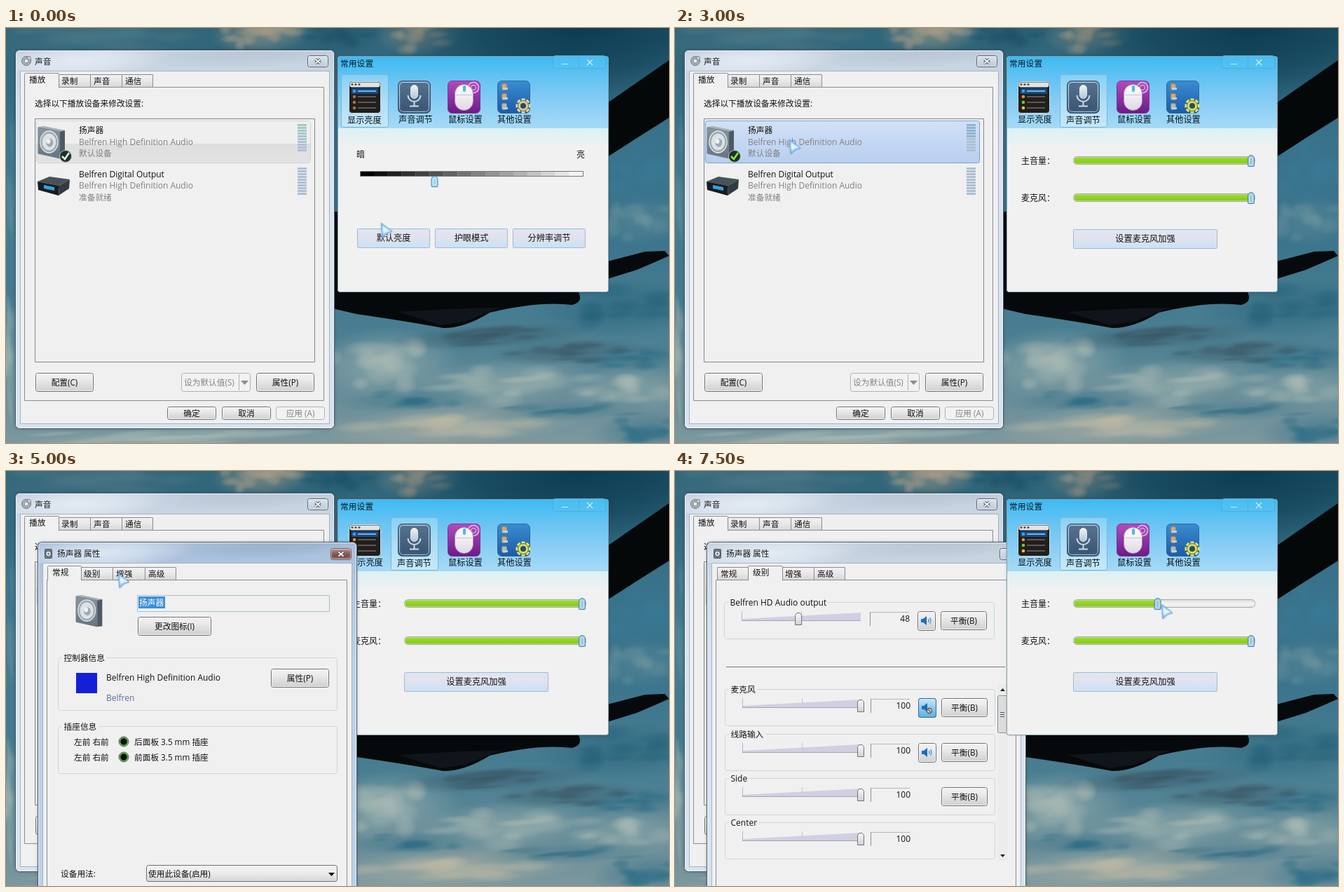
These frames come from a looping animation (946x592 px, 8 s). An HTML page with a canvas:

```html
<!DOCTYPE html>
<html lang="zh-CN">
<head>
<meta charset="utf-8">
<title>声音设置</title>
<style>
html, body { margin: 0; width: 946px; height: 592px; overflow: hidden; background: #3f6f80; }
canvas { display: block; }
</style>
</head>
<body>
<canvas id="stage" width="946" height="592"></canvas>
<script>
const c = document.getElementById('stage').getContext('2d');
const FONT = '"Open Sans","Noto Sans CJK SC","Noto Sans CJK",sans-serif';
const LOOP = 8000, STEP = 500;
const AUDIO = 'Belfren High Definition Audio';

// pointer position for each half second
const POINTER = [
  [535, 278], [513, 98], [89, 487], [587, 95], [587, 95], [588, 97], [163, 159], [182, 171],
  [389, 422], [399, 496], [160, 146], [144, 149], [627, 153], [855, 187], [822, 188], [694, 190]
];

function grad(y0, y1, ...cols) {
  const g = c.createLinearGradient(0, y0, 0, y1);
  cols.forEach((col, i) => g.addColorStop(i / (cols.length - 1), col));
  return g;
}

function box(x, y, w, h, fill, line, r = 0) {
  c.beginPath();
  c.roundRect(x + .5, y + .5, w - 1, h - 1, r);
  if (fill) { c.fillStyle = fill; c.fill(); }
  if (line) { c.strokeStyle = line; c.lineWidth = 1; c.stroke(); }
}

function rect(x, y, w, h, fill) {
  c.fillStyle = fill;
  c.fillRect(x, y, w, h);
}

function poly(pts, fill, line) {
  c.beginPath();
  pts.forEach(p => c.lineTo(p[0], p[1]));
  c.closePath();
  if (fill) { c.fillStyle = fill; c.fill(); }
  if (line) { c.strokeStyle = line; c.lineWidth = 1; c.stroke(); }
}

function disc(x, y, r, fill, line, lw = 1) {
  c.beginPath();
  c.arc(x, y, r, 0, 7);
  if (fill) { c.fillStyle = fill; c.fill(); }
  if (line) { c.strokeStyle = line; c.lineWidth = lw; c.stroke(); }
}

function text(s, x, y, col = '#111', size = 11.7, align = 'left') {
  c.font = size + 'px ' + FONT;
  c.textAlign = align;
  c.fillStyle = col;
  c.fillText(s, x, y);
}

function button(x, y, w, h, label, off) {
  box(x, y, w, h, off ? '#f2f2f2' : grad(y, y + h, '#f3f3f3', '#ebebeb', '#dcdcdc', '#cfcfcf'), off ? '#adb2b5' : '#707070', 3);
  if (!off) box(x + 1, y + 1, w - 2, h - 2, null, 'rgba(255,255,255,.7)', 2);
  if (label) text(label, x + w / 2, y + h / 2 + 4.5, off ? '#838383' : '#111', 11.7, 'center');
}

function blob(x, y, rx, ry, rgb, a) {
  c.save();
  c.translate(x, y);
  c.rotate(-.06);
  c.scale(rx, ry);
  const g = c.createRadialGradient(0, 0, 0, 0, 0, 1);
  g.addColorStop(0, `rgba(${rgb},${a})`);
  g.addColorStop(.5, `rgba(${rgb},${a * .65})`);
  g.addColorStop(1, `rgba(${rgb},0)`);
  c.fillStyle = g;
  c.fillRect(-1, -1, 2, 2);
  c.restore();
}

function sky() {
  let seed = 11;
  const rnd = () => (seed = seed * 16807 % 2147483647) / 2147483647;
  // a lumpy cloud: one soft body with small puffs around it
  const cloud = (x, y, w, h, rgb, a) => {
    blob(x, y, w, h, rgb, a * .6);
    for (let i = 0; i < 14; i++) {
      const t = rnd() * 6.3, d = rnd();
      blob(x + Math.cos(t) * d * w * .8, y + Math.sin(t) * d * h * .8, w * (.12 + rnd() * .2), h * (.15 + rnd() * .3), rgb, a * .6);
    }
  };
  const pale = '172,187,180', warm = '188,184,164', beige = '172,158,136';
  const blue = '46,108,132', deep = '12,60,82', dark = '58,88,102';

  rect(0, 0, 946, 592, grad(0, 592, '#2f6478', '#38718a', '#3a748c', '#4b7f92', '#7d989e'));
  cloud(120, 12, 190, 40, '84,124,136', .5);
  cloud(365, 6, 75, 32, beige, .9);
  cloud(590, 10, 64, 30, beige, .75);
  cloud(478, 8, 60, 34, '26,78,100', .7);
  blob(820, 0, 280, 120, deep, 1);
  cloud(915, 205, 80, 50, '58,122,148', .6);
  cloud(910, 275, 70, 36, '112,150,158', .6);
  cloud(5, 260, 24, 150, '90,140,154', .5);
  cloud(5, 470, 24, 90, pale, .5);

  cloud(880, 400, 130, 40, '34,96,120', .8);
  cloud(540, 478, 110, 50, pale, .8);
  cloud(710, 505, 130, 34, pale, .7);
  cloud(890, 515, 100, 34, pale, .6);
  cloud(640, 566, 190, 30, warm, .8);
  cloud(690, 440, 150, 18, dark, .9);
  cloud(800, 462, 110, 18, dark, .8);
  cloud(900, 470, 80, 20, blue, .7);
  cloud(580, 530, 110, 16, blue, .6);
  cloud(800, 546, 130, 16, blue, .6);
  cloud(920, 575, 90, 30, '40,106,132', .8);
  cloud(230, 584, 250, 14, pale, .7);

  // aircraft silhouette
  poly([[946, 46], [858, 107], [858, 184], [900, 157], [946, 128]], '#050809');
  poly([[858, 333], [912, 319], [940, 318], [946, 325], [928, 333], [900, 345], [858, 358]], '#060a0c');
  c.beginPath();
  c.moveTo(466, 262);
  c.lineTo(476, 262);
  c.lineTo(476, 374);
  c.lineTo(815, 374);
  c.quadraticCurveTo(826, 390, 808, 395);
  c.quadraticCurveTo(760, 389, 690, 406);
  c.quadraticCurveTo(655, 428, 624, 428);
  c.quadraticCurveTo(570, 418, 500, 408);
  c.lineTo(466, 400);
  c.fillStyle = '#05090b';
  c.fill();
  poly([[560, 405], [650, 400], [705, 399], [655, 419], [620, 424]], 'rgba(32,42,48,.4)');
}

function frame(x, y, h, title, active) {
  c.save();
  c.shadowColor = 'rgba(0,0,0,.3)';
  c.shadowBlur = 4;
  box(x, y, 456, h, '#c8d6e5', null, 6);
  c.restore();
  box(x, y, 456, h, active ? grad(y, y + 170, '#a9bfda', '#b6cbe4', '#bcd2ea') : grad(y, y + 150, '#c3d0dd', '#d1dde8', '#d8e3ef'), '#4a5968', 6);
  c.save();
  c.beginPath();
  c.rect(x + 2, y + 2, 452, 28);
  c.clip();
  blob(x + 90, y + 16, 130, 26, '236,243,250', .75);
  blob(x + 340, y + 5, 140, 20, active ? '140,165,196' : '175,191,207', .5);
  c.restore();
  box(x + 1, y + 1, 454, h - 2, null, 'rgba(255,255,255,.7)', 5);
  box(x + 7, y + 30, 442, h - 37, '#f0f0f0', '#a5b3c1');
  text(title, x + 28, y + 21, '#1a1a1a');
}

function closeBox(x, y, fill, mark) {
  box(x, y, 30, 17, fill, '#5c6670', 3);
  box(x + 1, y + 1, 28, 15, null, 'rgba(255,255,255,.45)', 2);
  for (const [col, w] of [['#454c55', 4], [mark, 2]]) {
    c.strokeStyle = col;
    c.lineWidth = w;
    c.beginPath();
    c.moveTo(x + 11.5, y + 5.5); c.lineTo(x + 18.5, y + 11.5);
    c.moveTo(x + 18.5, y + 5.5); c.lineTo(x + 11.5, y + 11.5);
    c.stroke();
  }
}

function tabs(names, edges, y, on) {
  names.forEach((s, i) => {
    if (i !== on) {
      box(edges[i], y, edges[i + 1] - edges[i] + 1, 19, grad(y, y + 19, '#f3f3f3', '#e8e8e8', '#d6d6d6'), '#898c95');
      text(s, edges[i] + 5, y + 14);
    }
  });
  const x = edges[on] - (on ? 2 : 1), w = edges[on + 1] - x + 2;
  box(x, y - 2, w, 22, '#f0f0f0', '#898c95', 1);
  rect(x + 1, y + 17, w - 2, 4, '#f0f0f0');
  text(names[on], x + 7, y + 12);
}

function speaker(x, y, k) {
  c.save();
  c.translate(x, y);
  c.scale(k, k);
  poly([[0, 1], [8, 0], [38, 6], [38, 46], [31, 46], [0, 39]], '#a4b0b9');
  poly([[0, 2], [31, 8], [31, 46], [0, 39]], grad(0, 46, '#8b97a1', '#67737e'), '#75828d');
  poly([[31, 8], [38, 6], [38, 45], [31, 46]], '#4d5a65');
  c.translate(15.5, 22.5);
  c.scale(.9, 1.1);
  disc(0, 0, 14, '#9aa6ae', '#dfe5e9', 1.5);
  disc(0, 0, 11, '#dce2e6');
  disc(1, 1, 5.5, '#9eaab3');
  disc(-1, -1, 3.2, '#eef1f3');
  c.restore();
}

function meter(y, top) {
  for (let i = 0; i < 10; i++) rect(416, y + i * 4, 13, 3, i < 5 && top ? top : '#adc0d4');
}

function soundDialog(hover) {
  frame(13, 31, 541, '声音', false);
  disc(29, 47, 6.5, '#a9b0b4', '#6d777d');
  disc(29, 47, 3, '#e8ecee', '#7f898f');
  disc(33, 43, 2.5, '#cfd4d6', '#7c868c');
  closeBox(430, 39, grad(39, 56, '#dce5ee', '#bccad8'), '#fff');
  box(26, 84, 428, 448, '#f0f0f0', '#898c95');
  tabs(['播放', '录制', '声音', '通信'], [27, 74, 120, 165, 209], 66, 0);
  text('选择以下播放设备来修改设置:', 41, 112);
  box(41, 129, 400, 348, '#f0f0f0', '#828790');

  if (hover) box(43, 132, 392, 61, grad(132, 193, '#d2e1f6', '#c4d8f3', '#b8cfee'), '#7b9fd4', 3);
  else {
    box(43, 132, 392, 61, '#efefef', '#d3d3d3', 3);
    rect(44, 165, 390, 27, grad(165, 192, '#dedede', '#e3e3e3'));
  }
  speaker(46, 140, 1);
  disc(85, 183, 8.5, '#1c3226', '#b9c4bd');
  c.beginPath();
  c.moveTo(80, 183); c.lineTo(84, 187); c.lineTo(90, 178);
  c.strokeStyle = hover ? '#8be83c' : '#e2f0e4';
  c.lineWidth = 2.6;
  c.stroke();
  text('扬声器', 104, 150);
  text(AUDIO, 104, 167, '#808080', 12);
  text('默认设备', 104, 183, '#808080');
  meter(137, hover ? '#8db4d0' : '#a2cac2');

  poly([[45, 219], [62, 212], [91, 216], [76, 225]], '#47525a');
  poly([[45, 219], [76, 225], [75, 239], [46, 231]], '#161d22');
  poly([[76, 225], [91, 216], [90, 229], [75, 239]], '#313b42');
  poly([[54, 224], [69, 227], [69, 232], [54, 229]], '#3e9fd6');
  text('Belfren Digital Output', 104, 213, '#111', 12);
  text(AUDIO, 104, 229, '#808080', 12);
  text('准备就绪', 104, 246, '#808080');
  meter(199);

  button(42, 492, 83, 27, '配置(C)');
  button(250, 492, 99, 27, '', true);
  text('设为默认值(S)', 254, 510, '#838383');
  rect(332, 494, 1, 23, '#adb2b5');
  poly([[335, 503], [346, 503], [340.5, 509]], '#8c8c8c');
  button(357, 492, 83, 27, '属性(P)');
  button(230, 540, 70, 19, '确定');
  button(308, 540, 70, 19, '取消');
  button(385, 540, 70, 19, '应用 (A)', true);
}

function icon(x, i, vivid) {
  if (i === 0) {
    box(x, 76, 46, 46, '#211e1e', '#cfdde4', 4);
    box(x + 1, 77, 44, 8, '#dfe4e6', null, 3);
    [0, 1, 2].forEach(k => disc(x + 5 + k * 5, 80.5, 1.6, '#555'));
    rect(x + 4, 86, 38, 8, '#174a80');
    ['#35a3f2', '#e8912c', '#6fce35', '#e8c32c'].forEach((col, k) => {
      const y = 90 + k * 8;
      disc(x + 8, y, 2.3, vivid || !k ? col : '#a5714f');
      rect(x + 13, y - 1, 26, 2, k ? '#5f5854' : '#6fb6ee');
    });
    return;
  }
  const skin = [0, ['#6a87a6', '#344e70'], ['#b34cc0', '#6b1a86'], ['#3a8dd2', '#1c5aa6']][i];
  box(x, 75, 47, 47, grad(75, 122, ...skin), ['', '#3d5872', '#7d3792', '#2c699f'][i], 6);
  if (i === 1) {
    box(x + 2, 77, 43, 43, null, '#b4c8d9', 5);
    box(x + 4, 79, 39, 39, grad(79, 118, '#56728f', '#3a5473'), '#4a6582', 3);
    box(x + 18, 81, 11, 20, grad(81, 101, '#f0f5f8', '#b4c4d3'), '#dfe8f0', 5);
    c.strokeStyle = '#d0dce7';
    c.lineWidth = 2;
    c.beginPath();
    c.arc(x + 23.5, 96, 9, 0, Math.PI);
    c.moveTo(x + 23.5, 105); c.lineTo(x + 23.5, 111);
    c.moveTo(x + 17, 111.5); c.lineTo(x + 30, 111.5);
    c.stroke();
  } else if (i === 2) {
    disc(x + 37, 85, 7.5, null, '#d9a6e2', 2);
    disc(x + 37, 85, 3.5, null, '#d9a6e2', 1.5);
    box(x + 10, 80, 27, 38, grad(80, 118, '#fff', '#e0d8e6'), '#a988b2', 13);
    rect(x + 12, 95, 23, 1, '#cbbfd2');
    box(x + 21, 81, 6, 11, '#4db9e8', '#e6f4fb', 3);
  } else {
    for (let k = 0; k < 3; k++) {
      box(x + 6, 79 + k * 14, 8, 10, k < 2 ? '#d0a874' : '#9dbdd0', '#a5835e', 2);
      rect(x + 8, 85 + k * 14, 7, 3, '#b5d2e8');
    }
    c.save();
    c.translate(x + 37, 111);
    for (let k = 0; k < 8; k++) {
      c.rotate(Math.PI / 4);
      rect(-2.5, -10.5, 5, 6, vivid ? '#dfe86b' : '#e6d9a6');
    }
    disc(0, 0, 7.5, vivid ? '#d3e062' : '#dccd95', '#6b6a3c');
    disc(0, 0, 4, '#2d4a62');
    c.restore();
  }
}

function knob(x, y, h, fill = '#9fd8f4') {
  c.beginPath();
  c.roundRect(x - 4.5, y + .5, 9, h, [5, 5, 1, 1]);
  c.fillStyle = fill;
  c.fill();
  c.strokeStyle = '#4c87a8';
  c.lineWidth = 1;
  c.stroke();
  box(x - 3, y + 3, 6, h - 4, null, 'rgba(255,255,255,.6)', 2);
}

function softButton(x, y, w, label) {
  box(x, y, w, 28, grad(y, y + 28, '#d9e8f6', '#e5e2ee', '#d6e3f2', '#cbe0f5'), '#a8b8c9', 1);
  text(label, x + w / 2, y + 18, '#111', 12.2, 'center');
}

function volume(y, v) {
  const x = 568 + 254 * v;
  box(568, y - 6, 260, 12, grad(y - 6, y + 6, '#d9d9d9', '#f4f4f4', '#e6e6e6'), '#a9a9a9', 5);
  box(569, y - 5, x - 567, 10, grad(y - 5, y + 5, '#a0dc3a', '#8fd31f', '#86c91d'), null, 4);
  knob(x, y - 8, 16, '#9cc9dd');
}

function settings(page, hover, level) {
  c.save();
  c.shadowColor = 'rgba(0,0,0,.3)';
  c.shadowBlur = 3;
  box(473, 40, 387, 337, '#f1f1f1', null, 3);
  c.restore();
  box(473, 40, 387, 337, '#f1f1f1', '#8aa0ac', 3);
  rect(474, 41, 385, 102, grad(41, 143, '#3dbaf2', '#68c4f3', '#8acef5', '#a6daf7'));
  rect(474, 143, 385, 27, grad(143, 170, '#def1f4', '#e4f1f2', '#f1f1f1'));
  text('常用设置', 477, 55, '#0a1a24', 11.8);
  box(780, 39, 76, 19, 'rgba(90,198,244,.35)', '#4fadda', 3);
  rect(817, 41, 1, 16, '#4fadda');
  rect(793, 51, 9, 1, '#d3effc');
  c.strokeStyle = '#d3effc';
  c.lineWidth = 1.2;
  c.beginPath();
  c.moveTo(829, 45); c.lineTo(837, 53);
  c.moveTo(837, 45); c.lineTo(829, 53);
  c.stroke();

  box(478 + page * 71, 66, 68, 76, grad(66, 142, 'rgba(205,236,250,.35)', 'rgba(215,240,251,.65)'), '#7fb6d2', 3);
  ['显示亮度', '声音调节', '鼠标设置', '其他设置'].forEach((s, i) => {
    icon([489, 559, 630, 701][i], i, page === 1);
    const down = i === page || i === hover;
    text(s, [489, 560, 631, 701][i] - (down ? 2 : 0), i === page ? 136 : 135, '#0a1218', 12.2);
  });

  if (page === 0) {
    text('暗', 500, 185, '#111', 12);
    text('亮', 814, 185, '#111', 12);
    for (let i = 0; i < 16; i++) {
      const v = Math.round(i * 16.2);
      rect(505 + i * 19.9, 205, 20, 7, `rgb(${v},${v},${v})`);
    }
    box(505, 204, 319, 8, null, '#777');
    knob(611.5, 211, 15);
    softButton(501, 286, 104, '默认亮度');
    softButton(612, 286, 104, '护眼模式');
    softButton(723, 286, 104, '分辨率调节');
  } else {
    text('主音量：', 494, 194, '#111', 12);
    text('麦克风：', 494, 247, '#111', 12);
    volume(189, level);
    volume(242, 1);
    softButton(568, 287, 206, '设置麦克风加强');
  }
}

function group(x, y, w, h, label, size = 12) {
  box(x, y, w, h, null, '#d0d4d9', 3);
  c.font = size + 'px ' + FONT;
  rect(x + 6, y - 2, c.measureText(label).width + 5, 5, '#f0f0f0');
  text(label, x + 8.5, y + 5, '#111', size);
}

function generalTab() {
  speaker(100, 177, .98);
  box(187, 177, 275, 24, '#f0f0f0', '#a9bccb');
  rect(189, 179, 38, 17, '#3b8fd8');
  text('扬声器', 190, 192, '#fff');
  button(188, 208, 105, 27, '更改图标(I)');
  group(74, 266, 399, 76, '控制器信息', 11.7);
  rect(100, 288, 30, 29, '#1420d8');
  text(AUDIO, 143, 299, '#111', 12);
  text('Belfren', 143, 328, '#5a6ea5', 12);
  button(378, 282, 83, 27, '属性(P)');
  group(74, 364, 399, 68, '插座信息', 11.7);
  ['后面板', '前面板'].forEach((s, i) => {
    const y = 386 + i * 22;
    text('左前 右前', 97, y + 5);
    disc(168, y, 5.5, '#050805', '#4f9e3b', 2);
    disc(168, y, 7, null, '#274d20', .8);
    text(s + ' 3.5 mm 插座', 183, y + 5);
  });
  text('设备用法:', 78, 579);
  box(200, 562, 273, 24, grad(562, 586, '#f3f3f3', '#ebebeb', '#d4d4d4'), '#707070', 3);
  text('使用此设备(启用)', 203, 579);
  poly([[460, 573], [469, 573], [464.5, 578]], '#111');
}

function soundButton(x, y, muted) {
  button(x, y, 26, 28);
  if (muted) box(x, y, 26, 28, grad(y, y + 28, '#cde7f8', '#8fc8ee', '#62abdc'), '#2f6c98', 3);
  poly([[x + 5, y + 11], [x + 8, y + 11], [x + 13, y + 7], [x + 13, y + 20], [x + 8, y + 16], [x + 5, y + 16]], '#1c6fb8');
  if (muted) {
    disc(x + 16, y + 18, 3.5, '#ddd', '#5f5a58', 1.4);
    c.beginPath();
    c.moveTo(x + 14, y + 16); c.lineTo(x + 18, y + 20);
    c.stroke();
  } else {
    c.strokeStyle = '#2f8fd8';
    c.lineWidth = 1.2;
    for (const r of [3, 6]) {
      c.beginPath();
      c.arc(x + 13, y + 13.5, r, -.8, .8);
      c.stroke();
    }
  }
}

function levelRow(x, y, label, value, extras, blue) {
  group(x, y, 386, 53, label, /[a-z]/.test(label) ? 12 : 11.7);
  poly([[x + 26, y + 24], [x + 195, y + 15], [x + 195, y + 26], [x + 26, y + 26]], '#d0d0e2');
  rect(x + 25, y + 13, 1, 14, '#b5b8c0');
  rect(x + 110, y + 13, 1, 8, '#c3c5cc');
  rect(x + 25, y + 26, 170, 1, '#a2a5ad');
  const t = x + 25 + 169 * value / 100;
  poly([[t - 4.5, y + 18.5], [t - 2, y + 15.5], [t + 2, y + 15.5], [t + 4.5, y + 18.5], [t + 4.5, y + 32.5], [t - 4.5, y + 32.5]],
    blue ? grad(y + 15, y + 33, '#d9f3fc', '#77cdec') : grad(y + 15, y + 33, '#fafafa', '#d0d0d0'), blue ? '#2d7fa0' : '#6f7174');
  rect(x + 208, y + 14, 56, 1, '#b4b7bd');
  rect(x + 208, y + 14, 1, 20, '#8e9299');
  text(value, x + 265, y + 28, '#111', 12, 'right');
  if (extras > 1) soundButton(x + 276, y + 13, extras === 3);
  if (extras) button(x + 309, y + 13, 66, 27, '平衡(B)');
}

function levelsTab(value, blue) {
  levelRow(70, 187, 'Belfren HD Audio output', value, 2, blue);
  rect(73, 279, 398, 1, '#777');
  levelRow(71, 311, '麦克风', 100, 3);
  levelRow(71, 375, '线路输入', 100, 2);
  levelRow(71, 438, 'Side', 100, 1);
  levelRow(71, 501, 'Center', 100, 0);
  rect(460, 304, 15, 252, '#ececec');
  poly([[464, 314], [471, 314], [467.5, 310]], '#222');
  poly([[464, 547], [471, 547], [467.5, 551]], '#222');
  box(460, 320, 15, 54, '#dcdcdc', '#8e8e8e', 2);
  for (let i = 0; i < 3; i++) rect(464, 344 + i * 3, 6, 1, '#555');
}

function properties(page, active, value) {
  frame(45, 101, 520, '扬声器 属性', active);
  box(55, 111, 11, 14, '#6f7c86', '#4c5963', 1);
  disc(60.5, 118, 4, '#e3e9ec', '#3f4a52');
  disc(60.5, 118, 1.5, '#6b7880');
  const warm = page ? grad(110, 127, '#f0b7a0', '#dc6844', '#c2451f', '#e08a5e') : grad(110, 127, '#c7aaa4', '#9a6a62', '#7c4a44', '#a87f74');
  closeBox(463, 110, active ? warm : grad(110, 127, '#dce5ee', '#bccad8'), '#fff');
  box(58, 155, 429, 480, '#f0f0f0', '#898c95');
  tabs(['常规', '级别', '增强', '高级'], [60, 106, 152, 198, 242], 137, page);
  if (page) levelsTab(value, active);
  else generalTab();
}

function pointer([x, y]) {
  c.save();
  c.translate(x, y);
  c.shadowColor = 'rgba(40,90,140,.35)';
  c.shadowBlur = 2;
  poly([[.5, .5], [16, 12.5], [9, 14.5], [2, 21]], grad(0, 21, '#8ecbfa', '#cfeaff', '#6fbcf5'), '#74b3e6');
  c.shadowBlur = 0;
  poly([[3, 5], [11, 11.5], [7, 12.5], [4, 15.5]], '#e6f4ff');
  c.restore();
}

function draw(n) {
  const level = n > 14 ? .475 : 1;
  const app = () => settings(n < 4 ? 0 : 1, n === 3 ? 1 : -1, level);
  const props = () => { if (n > 8) properties(n < 11 ? 0 : 1, n < 14, n > 14 ? 48 : 100); };
  sky();
  soundDialog(n === 6 || n === 7);
  (n < 14 ? [app, props] : [props, app]).forEach(f => f());
  pointer(POINTER[n]);
}

let last = -1;
const start = performance.now();
function tick() {
  const n = Math.floor((performance.now() - start) % LOOP / STEP);
  if (n !== last) draw(last = n);
  requestAnimationFrame(tick);
}
tick();
</script>
</body>
</html>
```
